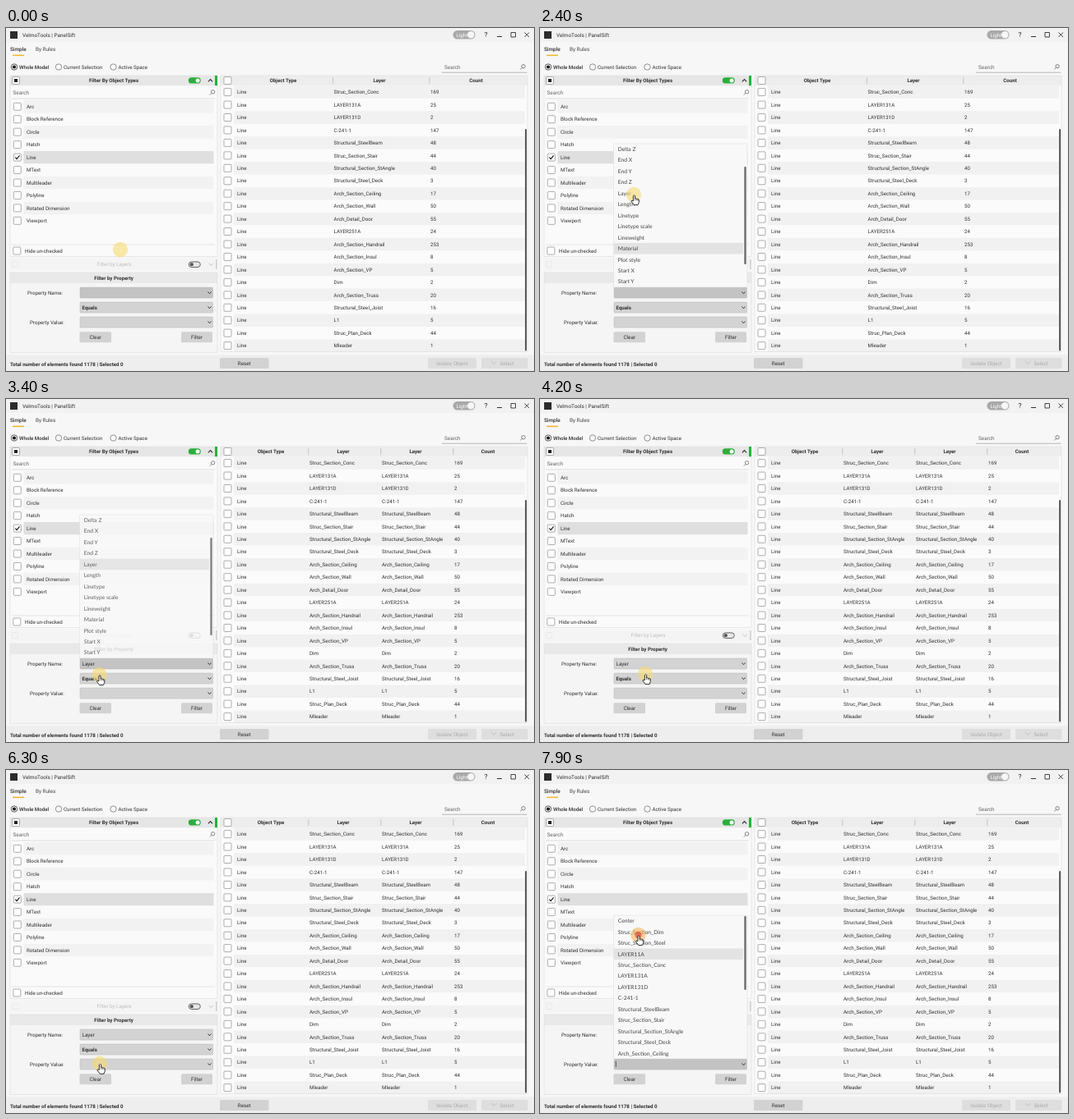
Write an HTML page with a canvas that moves like this. It is 642x418 px and loops after 8000 ms.

```html
<!DOCTYPE html>
<html lang="en">
<head>
<meta charset="utf-8">
<title>Element filter</title>
<style>
html, body { margin: 0; width: 100%; height: 100%; overflow: hidden; background: #f7f7f7; }
canvas { display: block; width: 642px; height: 418px; }
</style>
</head>
<body>
<canvas id="stage"></canvas>
<script>
const W = 642, H = 418, LOOP = 8000;
const canvas = document.getElementById('stage');
const ctx = canvas.getContext('2d');
const dpr = window.devicePixelRatio || 1;
canvas.width = W * dpr;
canvas.height = H * dpr;

const INK = '#303030';
const ROW = 15.45, ITEM = 13.45;
const types = ['Arc', 'Block Reference', 'Circle', 'Hatch', 'Line', 'MText', 'Multileader',
  'Polyline', 'Rotated Dimension', 'Viewport'];
const layers = [['Struc_Section_Conc', 169], ['LAYER131A', 25], ['LAYER131D', 2], ['C-241-1', 147],
  ['Structural_SteelBeam', 48], ['Struc_Section_Stair', 44], ['Structural_Section_StAngle', 40],
  ['Structural_Steel_Deck', 3], ['Arch_Section_Ceiling', 17], ['Arch_Section_Wall', 50],
  ['Arch_Detail_Door', 55], ['LAYER251A', 24], ['Arch_Section_Handrail', 253],
  ['Arch_Section_Insul', 8], ['Arch_Section_VP', 5], ['Dim', 2], ['Arch_Section_Truss', 20],
  ['Structural_Steel_Joist', 16], ['L1', 5], ['Struc_Plan_Deck', 44], ['Mleader', 1]];
const props = ['Angle', 'Delta X', 'Delta Y', 'Delta Z', 'End X', 'End Y', 'End Z', 'Layer', 'Length',
  'Linetype', 'Linetype scale', 'Lineweight', 'Material', 'Plot style', 'Start X', 'Start Y'];
const operators = ['Equals', 'Not Equals', 'Contains', "Doesn't Contains", 'Start With'];
const values = ['Center', 'Struc_Section_Dim', 'Struc_Section_Steel', 'LAYER11A', 'Struc_Section_Conc',
  'LAYER131A', 'LAYER131D', 'C-241-1', 'Structural_SteelBeam', 'Struc_Section_Stair',
  'Structural_Section_StAngle', 'Structural_Steel_Deck', 'Arch_Section_Ceiling'];

// Pointer path: time, x, y
const path = [[0, 139, 270], [600, 139, 270], [820, 137, 298], [1050, 132, 267], [1300, 131, 268],
  [1500, 130, 265], [1700, 126, 253], [1900, 121, 268], [2200, 121, 268], [2400, 114, 203],
  [3200, 114, 203], [3400, 113.5, 336], [4000, 113.5, 336], [4200, 128, 335], [4400, 114, 336],
  [4800, 114, 337], [5000, 114, 350], [5500, 114, 352], [5900, 115, 352], [6200, 114, 358],
  [7050, 114, 349], [7120, 114, 343], [7250, 114, 226], [7400, 114, 226], [7700, 114, 222], [7880, 119.5, 201],
  [8000, 119.5, 201]];
const clicks = [2750, 4750, 5550, 6450, 7850];

const clamp = v => Math.max(0, Math.min(1, v));
const ramp = (t, a, b) => clamp((t - a) / (b - a));

function pointer(t) {
  let i = 1;
  while (i < path.length - 1 && t > path[i][0]) i++;
  const [t0, x0, y0] = path[i - 1], [t1, x1, y1] = path[i];
  const k = ramp(t, t0, t1), e = k * k * (3 - 2 * k);
  return [x0 + (x1 - x0) * e, y0 + (y1 - y0) * e];
}

function rect(x, y, w, h, color, r = 0) {
  ctx.fillStyle = color;
  ctx.beginPath();
  ctx.roundRect(x, y, w, h, r);
  ctx.fill();
}

function frame(x, y, w, h, color, r = 0, width = 0.7) {
  ctx.strokeStyle = color;
  ctx.lineWidth = width;
  ctx.beginPath();
  ctx.roundRect(x, y, w, h, r);
  ctx.stroke();
}

function line(points, color = INK, width = 0.8) {
  ctx.strokeStyle = color;
  ctx.lineWidth = width;
  ctx.beginPath();
  points.forEach(([x, y]) => ctx.lineTo(x, y));
  ctx.stroke();
}

function disc(x, y, r, color) {
  ctx.fillStyle = color;
  ctx.beginPath();
  ctx.arc(x, y, r, 0, 7);
  ctx.fill();
}

function ring(x, y, r, color = INK, width = 0.8) {
  ctx.strokeStyle = color;
  ctx.lineWidth = width;
  ctx.beginPath();
  ctx.arc(x, y, r, 0, 7);
  ctx.stroke();
}

// y is the middle of the capitals
function text(s, x, y, { size = 6.2, weight = 400, color = INK, align = 'left', family = 'Roboto' } = {}) {
  ctx.font = `${weight} ${size}px ${family}, sans-serif`;
  ctx.textAlign = align;
  ctx.fillStyle = color;
  ctx.fillText(s, x, y + size * 0.36);
}

const bold = (s, x, y, align = 'left', color = INK) => text(s, x, y, { weight: 700, size: 6.15, align, color });

function checkbox(x, y, color = '#8c8c8c') {
  rect(x - 4.5, y - 4.5, 9, 9, '#fff', 1);
  frame(x - 4.5, y - 4.5, 9, 9, color, 1);
}

function chevron(x, y, w, h, color = INK, width = 1) {
  line([[x - w, y - h], [x, y + h], [x + w, y - h]], color, width);
}

function magnifier(x, y) {
  ring(x + 0.6, y - 0.6, 2.2, '#555', 0.7);
  line([[x - 1, y + 1], [x - 3.2, y + 3.2]], '#555', 0.7);
}

function button(label, x, y, w, off) {
  rect(x, y, w, 13, off ? '#dedede' : '#d2d2d2', 1.5);
  text(label, x + w / 2 + (label === 'Select' ? 3 : 0), y + 6.6,
    { align: 'center', color: off ? '#aaa' : INK, size: 6.3 });
}

function combo(y, value, active, strong) {
  rect(90, y - 6.5, 161.5, 13, active ? '#c3c3c3' : '#d3d3d3', 1);
  frame(90, y - 6.5, 161.5, 13, '#b6b6b6', 1, 0.5);
  if (value) text(value, 92.5, y, { weight: strong ? 700 : 400, size: strong ? 6.15 : 6.4 });
  chevron(247.5, y, 2, 1.1);
}

function titleBar() {
  rect(0, 0, W, 17, '#f2f2f2');
  rect(5, 4, 9, 9, '#2c2c2c');
  text('VelmoTools | PanelSift', 20, 8.3, { size: 6.4 });
  rect(543.5, 3, 27, 10.5, '#a9a9a9', 5.2);
  text('Light', 547.5, 8.3, { color: '#fff', size: 6.2 });
  disc(565.3, 8.2, 4.2, '#f6f6f6');
  text('?', 583.5, 8.3, { size: 8.5, align: 'center' });
  line([[597, 10.5], [603, 10.5]], INK, 1);
  frame(614, 5.5, 5.5, 5.5, INK, 0, 0.9);
  line([[630.5, 5.5], [636, 11]], INK, 0.9);
  line([[636, 5.5], [630.5, 11]], INK, 0.9);
}

function topControls() {
  text('Simple', 5, 25.8, { weight: 500, size: 6.4 });
  rect(8, 32.6, 14, 1.5, '#f0b52c');
  text('By Rules', 36, 25.8, { size: 6.4, color: '#444' });
  [['Whole Model', 10], ['Current Selection', 64], ['Active Space', 130.5]].forEach(([s, x], i) => {
    ring(x, 47.5, 3.7, i ? '#777' : INK, 0.8);
    if (!i) disc(x, 47.5, 2.1, '#1c1c1c');
    text(s, x + 6, 47.6, { weight: i ? 400 : 500 });
  });
  text('Search', 533, 47.4, { size: 6.4, color: '#666' });
  magnifier(628.5, 47.3);
  line([[530, 54.2], [633.5, 54.2]], '#9a9a9a', 0.7);
}

function toggle(x, y, on, color) {
  if (on) {
    rect(x - 7.5, y - 3.7, 15, 7.4, '#2cae3c', 3.7);
    disc(x + 3.8, y, 2.5, '#fff');
  } else {
    rect(x - 7, y - 3.3, 14, 6.6, '#e6e6e6', 3.3);
    frame(x - 7, y - 3.3, 14, 6.6, color, 3.3, 0.9);
    disc(x - 3.5, y, 2.1, color);
  }
}

function typePanel() {
  rect(5, 58, 252, 220.5, '#fafafa');
  rect(5, 58, 252, 12.2, '#e6e6e6');
  frame(5, 58, 252, 220.5, '#dcdcdc', 0, 0.6);
  checkbox(12, 64);
  rect(10, 62, 4, 4, '#222');
  bold('Filter By Object Types', 131, 64.2, 'center');
  toggle(229.3, 63.9, true);
  chevron(248.5, 64, 2.6, -1.4, INK, 1.1);
  rect(254, 58, 3, 12.2, '#22b43a');
  text('Search', 8.5, 78.6, { size: 6.4, color: '#666' });
  magnifier(251, 78.4);
  line([[7, 86], [254, 86]], '#c6c6c6', 0.6);
  types.forEach((s, i) => {
    const y = 95.8 + i * ROW, picked = s === 'Line';
    if (i % 2 === 0) rect(21.5, y - ROW / 2, 231, ROW, picked ? '#dfdfdf' : '#f2f2f2');
    checkbox(13.8, y);
    if (picked) line([[11.3, y], [13.1, y + 2], [16.5, y - 2.3]], '#111', 1.1);
    text(s, 25, y);
  });
  line([[7, 264], [254, 264]], '#d6d6d6', 0.6);
  checkbox(13.3, 271.5);
  text('Hide un-checked', 23, 271.7);
}

function layerPanel() {
  rect(5, 281, 252, 14, '#f4f4f4');
  frame(7.5, 284.5, 7, 7, '#e5e5e5', 1);
  text('Filter by Layers', 131.5, 288.2, { align: 'center', color: '#bdbdbd', size: 6.3 });
  toggle(229.3, 288.2, false, '#555');
  chevron(249.3, 288.2, 2.5, 1.3, '#c2c2c2');
  rect(255, 282, 1.8, 12, '#d3d3d3');
}

function propertyPanel(t, open) {
  rect(5, 298, 252, 97.5, '#f5f5f5');
  rect(5, 298, 252, 13, '#e9e9e9');
  frame(5, 298, 252, 97.5, '#dcdcdc', 0, 0.6);
  bold('Filter by Property', 131, 304.7, 'center');
  text('Property Name:', 26, 322.8);
  text('Property Value:', 29, 358.7);
  combo(322.6, t >= 3200 ? 'Layer' : '', t < 3900);
  combo(340.6, 'Equals', open === 1, true);
  combo(358.6, '', t >= 6450);
  if (t >= 6700 && t % 1000 >= 500) line([[92.3, 354.8], [92.3, 362]], '#222', 0.7);
  button('Clear', 89.5, 370.3, 38.5);
  button('Filter', 213, 370.3, 38);
}

function table(split) {
  const cols = split ? [281, 369, 457, 545] : [281, 398.6, 516];
  const heads = split ? ['Object Type', 'Layer', 'Layer', 'Count'] : ['Object Type', 'Layer', 'Count'];
  const mids = split ? [322, 410, 498, 586] : [337, 454, 571.5];
  rect(261, 58, 373, 336.5, '#fbfbfb');
  rect(261, 58, 373, 12.2, '#ededed');
  checkbox(269.5, 64);
  heads.forEach((s, i) => {
    bold(s, mids[i], 64.2, 'center');
    if (i) line([[cols[i] - 1.2, 60], [cols[i] - 1.2, 68]], '#b5b5b5', 0.7);
  });
  layers.forEach(([name, count], i) => {
    const y = 78.1 + i * ROW;
    if (i % 2 === 0) rect(277, y - ROW / 2, 354, ROW, '#f1f1f1');
    checkbox(269.5, y);
    text('Line', cols[0], y);
    for (let c = 1; c < cols.length - 1; c++) text(name, cols[c], y);
    text(count, cols[cols.length - 1], y);
  });
  frame(261, 58, 373, 336.5, '#dcdcdc', 0, 0.6);
  rect(631.2, 123, 1.9, 270.5, '#4a4a4a', 1);
}

function footer() {
  rect(0, 398.5, W, 19.5, '#eeeeee');
  bold('Total number of elements found 1178 | Selected 0', 5, 409.3);
  button('Reset', 260, 402, 59.5);
  button('Isolate Object', 513, 402, 59, true);
  button('Select', 578, 402, 56.5, true);
  line([[590, 406], [593, 409.5], [596, 406.5]], '#b4b4b4', 0.7);
}

function popup(items, y, h, alpha, hoverY, thumb, strong) {
  if (alpha <= 0) return;
  ctx.save();
  ctx.globalAlpha = alpha;
  rect(89.5, y, 162.5, h, '#f8f8f8');
  frame(89.5, y, 162.5, h, '#d8d8d8', 0, 0.5);
  ctx.beginPath();
  ctx.rect(89.5, y, 162.5, h);
  ctx.clip();
  const hover = Math.floor((hoverY - y) / ITEM);
  items.forEach((s, i) => {
    const top = y + i * ITEM;
    if (i === hover) rect(90, top, 157, ITEM, '#e3e3e3');
    if (strong) bold(s, 94.8, top + 6.6);
    else text(s, 94.8, top + 6.6, { family: 'Lato', size: 6.7, color: '#444' });
  });
  if (thumb) rect(248.4, thumb[0], 2.2, thumb[1], '#626262', 1);
  ctx.restore();
}

function hand(x, y) {
  ctx.save();
  ctx.translate(x, y);
  ctx.beginPath();
  ctx.moveTo(-1.1, 7);
  ctx.lineTo(-1.1, 0.9);
  ctx.quadraticCurveTo(0, -0.6, 1.1, 0.9);
  ctx.lineTo(1.1, 4.2);
  ctx.quadraticCurveTo(2.2, 3.5, 2.9, 4.7);
  ctx.quadraticCurveTo(4, 4, 4.5, 5.2);
  ctx.quadraticCurveTo(5.8, 4.9, 5.9, 6.2);
  ctx.lineTo(5.7, 9);
  ctx.lineTo(4.5, 12);
  ctx.lineTo(-0.3, 12);
  ctx.lineTo(-3.6, 7.5);
  ctx.quadraticCurveTo(-3.4, 5.7, -1.1, 7.2);
  ctx.closePath();
  ctx.fillStyle = '#fff';
  ctx.fill();
  ctx.strokeStyle = '#1a1a1a';
  ctx.lineWidth = 0.9;
  ctx.stroke();
  line([[1.1, 4.2], [1.1, 6.5]], '#1a1a1a', 0.6);
  line([[2.9, 4.8], [2.9, 6.7]], '#1a1a1a', 0.6);
  line([[4.5, 5.3], [4.5, 7]], '#1a1a1a', 0.6);
  ctx.restore();
}

function drawPointer(t) {
  const [x, y] = pointer(t);
  const press = clicks.reduce((k, c) => t >= c ? Math.max(k, clamp(1 - (t - c) / 400)) : k, 0);
  disc(x, y, 9.2, `rgba(${248 - 4 * press}, ${219 - 40 * press}, ${112 - 20 * press}, 0.6)`);
  if (press) disc(x, y, 4.2, `rgba(228, 62, 45, ${press * press * 0.85})`);
  if (t >= 100) hand(x + 0.5, y + 0.6);
}

function draw(t) {
  ctx.setTransform(dpr, 0, 0, dpr, 0, 0);
  ctx.textRendering = 'geometricPrecision';
  ctx.textBaseline = 'alphabetic';
  rect(0, 0, W, H, '#f7f7f7');
  const open = t >= 4750 && t < 5800 ? 1 : 0;
  titleBar();
  topControls();
  typePanel();
  layerPanel();
  propertyPanel(t, open);
  table(t >= 3200);
  footer();

  // The highlight trails the pointer
  const hoverY = pointer(Math.max(0, t - 200))[1];
  const scrolled = t >= 2300;
  popup(scrolled ? props.slice(3) : props.slice(0, 13), 141, 174.9,
    ramp(t, 80, 250) * (1 - ramp(t, 3370, 3570)), hoverY, [scrolled ? 169 : 142, 119]);
  popup(operators, 347.3, 72, ramp(t, 4750, 4900) * (1 - ramp(t, 5700, 5850)), hoverY, null, true);
  popup(values, 177.2, 174.7, ramp(t, 6500, 6700), hoverY, [178, 90]);
  drawPointer(t);
}

function tick() {
  draw(performance.now() % LOOP);
  requestAnimationFrame(tick);
}
tick();
</script>
</body>
</html>
```
